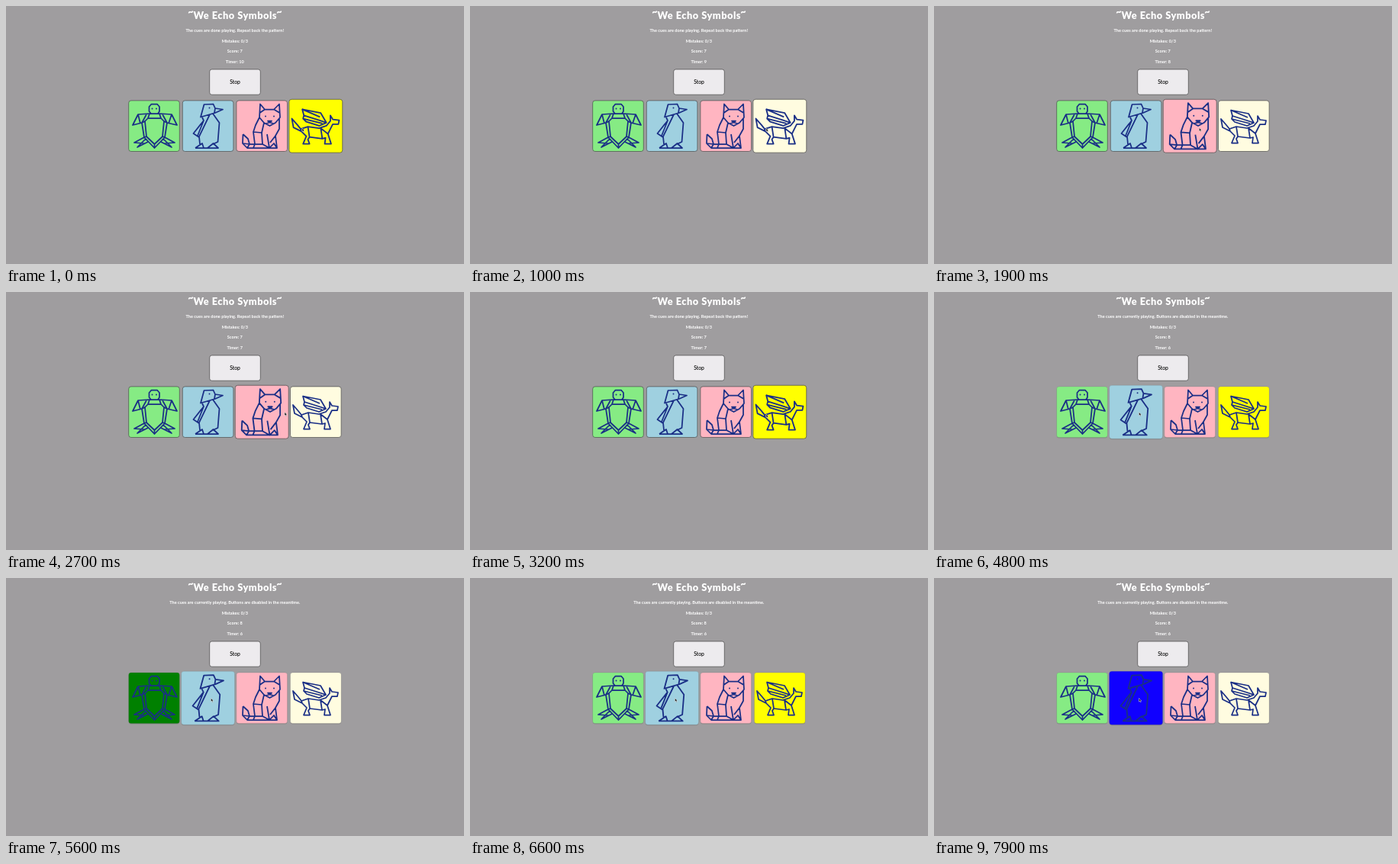
An HTML page that plays this animation: 600x338 px, repeating every 8 s.

```html
<!DOCTYPE html>
<html lang="en">
<head>
<meta charset="utf-8">
<title>Memory game</title>
<style>
html, body { margin: 0; width: 100%; height: 100%; overflow: hidden; background: #9f9d9f; }
svg { display: block; width: 600px; height: 338px; }
text { font-family: Lato, sans-serif; text-anchor: middle; fill: #fff; font-size: 5.62px; font-weight: 700; }
.title { font-size: 12.8px; font-weight: 900; letter-spacing: .5px; }
.stop { font-size: 6.8px; font-weight: 600; fill: #111; }
.art { fill: none; stroke: #1a2f86; stroke-width: 1.75; stroke-linejoin: round; }
.eye { fill: #1a2f86; }
</style>
</head>
<body>
<svg viewBox="0 0 600 338">
  <rect width="600" height="338" fill="#9f9d9f"/>
  <text class="title" x="242.3" y="11.8">~</text>
  <text class="title" x="300.3" y="17">We Echo Symbols</text>
  <text class="title" x="358.2" y="11.8">~</text>
  <text id="status" x="299.8" y="34.2"></text>
  <text x="299.8" y="47.5">Mistakes: 0/3</text>
  <text id="score" x="299.8" y="61"></text>
  <text id="timer" x="299.8" y="74.6"></text>
  <rect x="266.7" y="83" width="66.6" height="33.2" rx="3" fill="#edebee" stroke="#444" stroke-width=".7"/>
  <text class="stop" x="300" y="102.4">Stop</text>
  <g id="tiles"></g>
  <path id="cursor" d="M0 0V4.6L1.1 3.6L1.9 5.3L2.7 4.9L1.9 3.3H3.3Z" fill="#111" stroke="#fff" stroke-width=".45"/>
</svg>
<script>
const LOOP = 8000, CUES_START = 3700;
const TOP = 123.9, SIZE = 66.6, HOVER = 1.05;

const tiles = {
  turtle: {
    x: 160.7, off: '#86eb84', on: '#008000', eyes: [[191.5, 134.5], [197, 134.5]],
    art: 'M190.5 128.5H198L201 132V138L199 141H190L187.5 138V132Z' +
      'M173 142L188 141H201L217 142L224 156L211 153L208 172L194.5 186L181 172L178 153L166 156Z' +
      'M186 147H203L207 151L205 171L194.5 181L184 171L182 151Z' +
      'M184 142L178 153M205 142L211 153M188 141L186 147M201 141L203 147M173 142L176 154M217 142L213 154' +
      'M178 153L182 151M211 153L207 151M181 172L184 171M208 172L205 171M194.5 181V186' +
      'M181 172L168 179L181 180M183 174L172 185L186 178' +
      'M208 172L221 179L208 180M206 174L217 185L203 178'
  },
  penguin: {
    x: 231.3, off: '#9fd0e0', on: '#1000ff', eyes: [[266.5, 133.5]],
    art: 'M259.5 129L271.5 128.5L274 134L284 135.5L274 140L255 145.5Z M274 134L273 140' +
      'M271 141L279.5 153L277.5 178L271 181M267 142L253 171L254 181' +
      'M257 146L259 150L245.5 167L253 172M259 150L251 170' +
      'M248 186H278L271.5 180L264 186M248 186L257 180L259 186'
  },
  cat: {
    x: 301.9, off: '#ffb5c1', on: '#ff4fa3', eyes: [[340, 144.5], [351, 144.5]],
    art: 'M333 128.5L339 135.5H351L358 128.5L359 146L353 153L345.5 157L338 153L332 146Z' +
      'M332.500 140L339 135.5M351 135.5L358.500 140M343 150.500H348L345.5 152.500ZM341 154L345.5 152.500L350 154' +
      'M332 146L327 156L324 165L326 181M324 165L335 166L338 153M358 147L358 161L353 170L355 186' +
      'M335 166L336 181L326 181M336 181L345 186L342 168M353 170L346 179' +
      'M310.5 168L317 174L319 181L326 181M310.5 168L310 180L316 186H355L351 180L345 186M310 180L319 181L316 186M326 181L324 186'
  },
  dragon: {
    x: 372.5, off: '#fffce0', on: '#ffff00', eyes: [],
    art: 'M389 136.5L412 141L419 153L410 150L391 144ZM389 136.5L411 146' +
      'M391 144L390 148L394 152L410 157L419 153M390 148L414 154' +
      'M376 148L378 159L388 164L387 161L383 156Z' +
      'M387 161L396 158L410 160L419 157L424 151L424 144L427 149L435 150L434 155L427 155L424 161L421 167' +
      'M396 158L398 171L414 173L412 160M388 164L394 170L390 179.5H398L396 174L398 171' +
      'M414 173L418 172L417 179.5H425L421 167L412 160'
  }
};

// [time, x, y] of the pointer tip
const path = [
  [0, 388, 160], [150, 388, 160], [400, 200, 158], [550, 200, 158],
  [840, 388, 160], [1050, 388, 160], [1250, 268, 158], [1380, 268, 158],
  [1510, 200, 158], [1670, 200, 158], [2000, 388, 160], [2320, 388, 160],
  [2500, 365, 157.5], [2870, 365, 157.5], [3050, 388, 160], [3350, 388, 160],
  [3800, 268.5, 157.5], [LOOP, 268.5, 157.5]
];

// [from, to, lit tile]
const lit = [
  [0, 150, 'dragon'], [420, 540, 'turtle'], [860, 970, 'dragon'], [1260, 1370, 'penguin'],
  [1530, 1650, 'turtle'], [2100, 2250, 'dragon'], [2740, 2860, 'cat'], [3150, 3320, 'dragon'],
  [4690, 5490, 'dragon'], [5590, 6460, 'turtle'], [6560, 7390, 'dragon'], [7490, LOOP, 'penguin']
];

const $ = id => document.getElementById(id);

function add(parent, tag, attrs) {
  const el = document.createElementNS('http://www.w3.org/2000/svg', tag);
  for (const key in attrs) el.setAttribute(key, attrs[key]);
  return parent.appendChild(el);
}

for (const tile of Object.values(tiles)) {
  tile.g = add($('tiles'), 'g', {});
  tile.shade = add(tile.g, 'rect', { x: tile.x, y: TOP + 1, width: SIZE, height: SIZE, rx: 3.2, fill: '#777' });
  tile.face = add(tile.g, 'rect', { x: tile.x, y: TOP, width: SIZE, height: SIZE, rx: 3.2, 'stroke-width': .65 });
  add(tile.g, 'path', { class: 'art', d: tile.art });
  for (const [cx, cy] of tile.eyes) add(tile.g, 'circle', { class: 'eye', cx, cy, r: .95 });
}

function pointer(t) {
  const i = Math.max(1, path.findIndex(p => p[0] > t));
  const [t0, x0, y0] = path[i - 1], [t1, x1, y1] = path[i];
  const k = (t - t0) / (t1 - t0), e = k * k * (3 - 2 * k);
  return [x0 + (x1 - x0) * e, y0 + (y1 - y0) * e];
}

function setText(id, value) {
  if ($(id).textContent !== value) $(id).textContent = value;
}

function draw(t) {
  const cues = t >= CUES_START;
  const [x, y] = pointer(t);
  const active = lit.find(([from, to]) => t >= from && t < to);

  setText('status', cues
    ? 'The cues are currently playing. Buttons are disabled in the meantime.'
    : 'The cues are done playing. Repeat back the pattern!');
  setText('score', 'Score: ' + (cues ? 8 : 7));
  setText('timer', 'Timer: ' + (10 - Math.min(4, Math.floor((t + 300) / 1000))));

  for (const [name, tile] of Object.entries(tiles)) {
    const hover = x >= tile.x && x <= tile.x + SIZE;
    const cx = tile.x + SIZE / 2, cy = TOP + SIZE / 2;
    tile.g.setAttribute('transform', hover
      ? `translate(${cx} ${cy}) scale(${HOVER}) translate(${-cx} ${-cy})` : '');
    tile.face.setAttribute('fill', active && active[2] === name ? tile.on : tile.off);
    tile.face.setAttribute('stroke', cues ? 'rgba(90,90,90,.25)' : '#444');
    tile.shade.setAttribute('opacity', cues ? .5 : 0);
  }
  $('cursor').setAttribute('transform', `translate(${x} ${y})`);
}

const start = performance.now();
function tick() {
  draw((performance.now() - start) % LOOP);
  requestAnimationFrame(tick);
}
tick();
</script>
</body>
</html>
```
